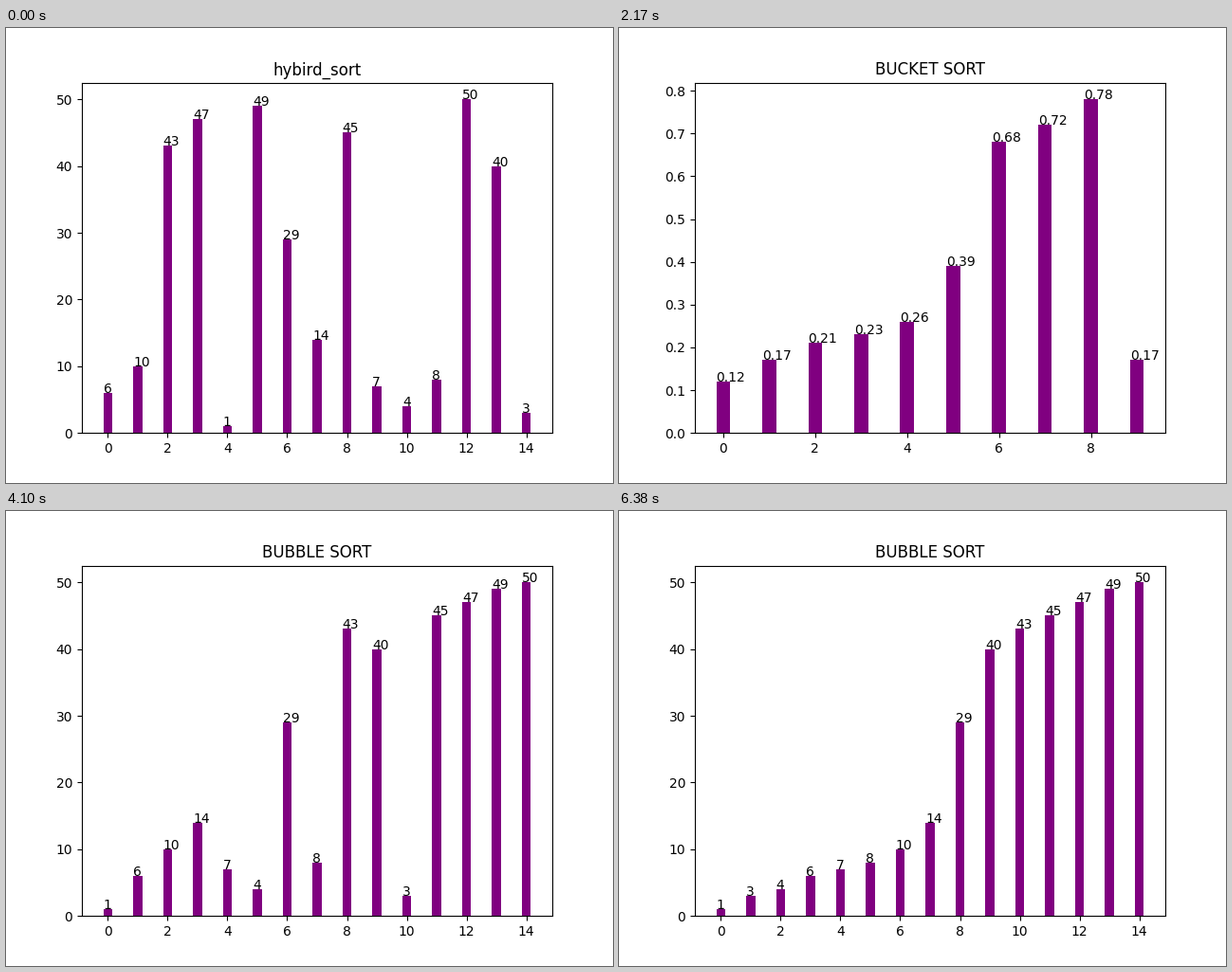
Recreate the animation shown at these times as a matplotlib script. Size 640 by 480 pixels, loop 6500 ms.

```python
import matplotlib.pyplot as plt
from matplotlib.animation import FuncAnimation

DATA = [6, 10, 43, 47, 1, 49, 29, 14, 45, 7, 4, 8, 50, 40, 3]
FRACTIONS = [0.78, 0.68, 0.39, 0.26, 0.72, 0.96, 0.21, 0.12, 0.23, 0.17]
LOOP_MS = 6500
SMALL = 8
WIDTH = 0.3


def partition(a, lo, hi):
    """Lomuto partition around the last item."""
    i = lo
    for j in range(lo, hi):
        if a[j] < a[hi]:
            a[i], a[j] = a[j], a[i]
            i += 1
    a[i], a[hi] = a[hi], a[i]
    return i


def hybrid_states(data):
    """Quicksort passes, until every part is small enough for insertion."""
    a = data[:]
    states = [a[:]]
    parts = [(0, len(a) - 1)]
    while parts:
        lo, hi = parts.pop()
        if hi - lo + 1 <= SMALL:
            continue
        p = partition(a, lo, hi)
        states.append(a[:])
        parts += [(lo, p - 1), (p + 1, hi)]
    return states + [a[:]]


def overwrite_states(data):
    """Sorted values written over the data, one at a time."""
    done = sorted(data)
    return [done[:n] + data[n:] for n in range(1, len(data) + 1)]


def bucket_states(data):
    # filling the buckets leaves the list itself as it was
    return [data] * len(data) + overwrite_states(data) + [sorted(data)]


def bubble_states(data):
    a = data[:]
    states = []
    for end in range(len(a) - 1, 0, -1):
        for j in range(end):
            if a[j] > a[j + 1]:
                a[j], a[j + 1] = a[j + 1], a[j]
                states.append(a[:])
    return states


# All sorts run side by side; the first one still running is on show.
RUNS = [
    ("hybird_sort", hybrid_states(DATA)),
    ("count_sort", overwrite_states(DATA)),
    ("BUCKET SORT", bucket_states(FRACTIONS)),
    ("BUBBLE SORT", bubble_states(DATA)),
]
FRAMES = len(RUNS[-1][1])

fig, ax = plt.subplots(figsize=(6.4, 4.8), dpi=100)


def draw(k):
    title, states = next(run for run in RUNS if k < len(run[1]))
    values = states[k]
    ax.clear()
    ax.set_title(title)
    ax.bar(range(len(values)), values, width=WIDTH, color="purple")
    for i, v in enumerate(values):
        ax.text(i - WIDTH / 2, v, str(v))
    return []


anim = FuncAnimation(fig, draw, frames=FRAMES, init_func=lambda: draw(0),
                     interval=LOOP_MS / FRAMES, repeat=True, repeat_delay=0)
plt.show()
```
